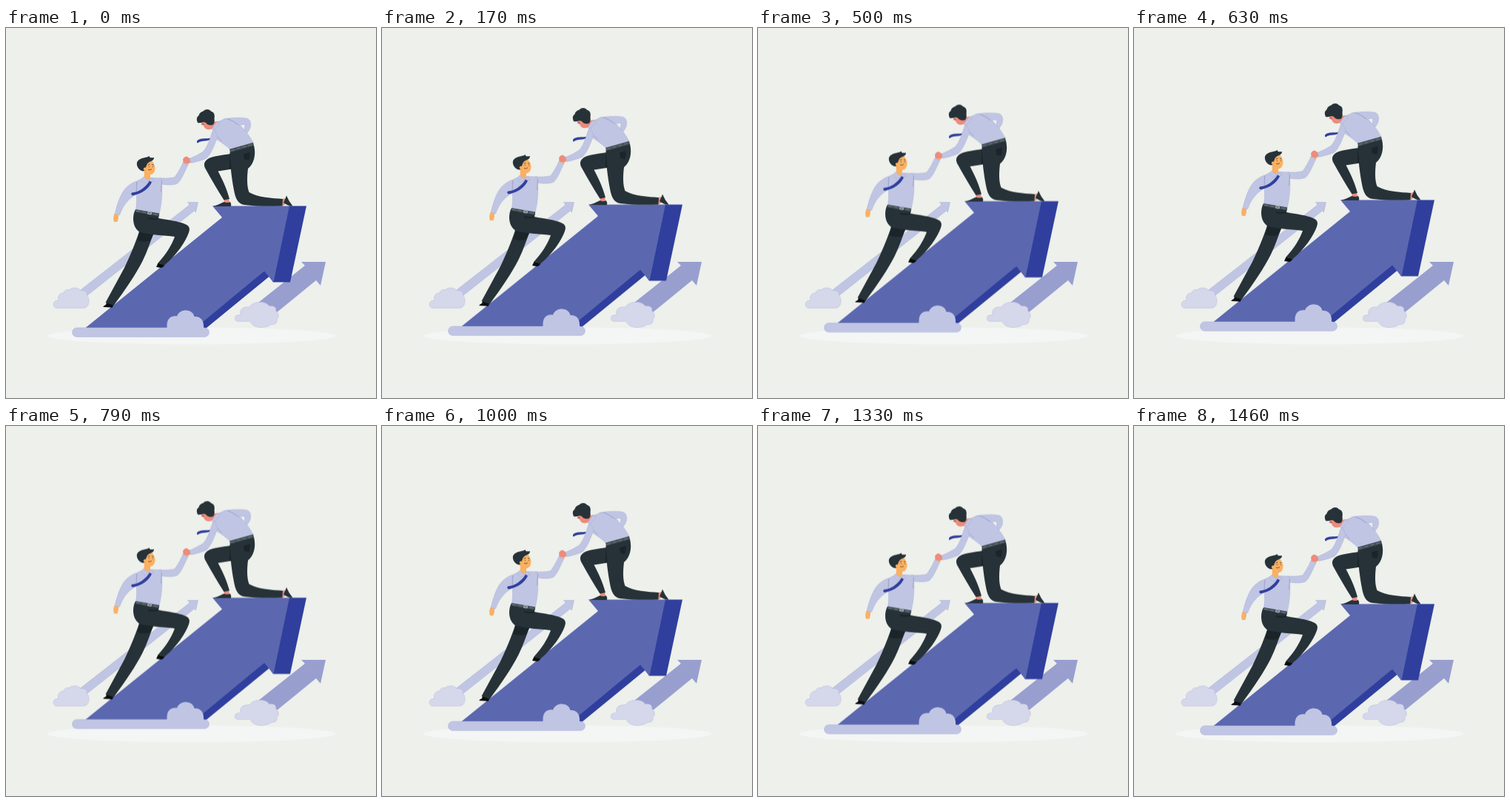
Recreate the animation shown at these times as an HTML page. Size 500 by 500 pixels, loop 1500 ms.

```html
<!DOCTYPE html>
<html lang="en">
<head>
<meta charset="utf-8">
<title>Helping hand</title>
<style>
  html, body { margin: 0; width: 100%; height: 100%; overflow: hidden; background: #edf0eb; }
  svg { display: block; width: 100%; height: 100%; }
  .pale { fill: #c0c5e3; }
  .mist { fill: #d5d7ea; stroke: #b9bedf; stroke-width: .5; }
  .front { fill: #5b68b0; }
  .navy { fill: #303f9d; }
  .shirt { fill: #c0c5e3; stroke: #a4aad3; stroke-width: .4; }
  .dark { fill: #263238; }
  .deep { fill: #1b2429; }
  .black { fill: #0b0d0f; }
  .pink { fill: #ed8b7c; }
  .tan { fill: #fbb062; }
  .belt { fill: #455158; }
  .fold { fill: none; stroke: #8b93c6; stroke-width: .6; }
  .mark { fill: none; stroke: #263238; stroke-width: .7; stroke-linecap: round; }
  .stitch { fill: none; stroke: #808b92; stroke-width: .7; stroke-dasharray: 5 3; }
  .lift { animation: lift .75s cubic-bezier(.35, .26, .65, .74) -.02s infinite alternate; }
  @keyframes lift {
    from { transform: translateY(.2px); }
    to { transform: translateY(-9.1px); }
  }
</style>
</head>
<body>
<svg viewBox="0 0 500 500">
  <ellipse cx="250.5" cy="416" rx="194.5" ry="11.5" fill="#f4f5f5"/>

  <!-- Far arrows and clouds -->
  <path class="shirt" d="M97 357 L248 239 L245.500 235.500 L259.500 235.500 L256.500 249 L254.500 247 L106 364.500Z"/>
  <path class="mist" d="M69 378.500 A5 5 0 0 1 69 368.500 L71 368.500 C69 363 72 358 78 358 C79 354 82 353 85 354 C89 350 98 350 101 355 C106 354 110 357 109.500 361.500 C113 365 113 372 110 376 Q108 378.500 104 378.500Z"/>
  <path fill="#989fcf" d="M341 371 L404 321 L399 316 L432 316 L425 348 L419 341 L362 387.500Z"/>
  <path class="mist" d="M313 396.500 A4.300 4.300 0 0 1 313 388 L317 387.500 C315 381 320 376 329 377 C332 372 338 370 344 370.500 C350 370.500 354 373 356 376 C362 374.500 366 378 364.500 382 C369 385 369.500 391 366 394 C367 398 364 401 359 400.500 C354 404.500 348 404.500 343 404.500 C336 404 332 401 330 396.500Z"/>

  <g class="lift">
    <!-- Main arrow -->
    <path class="navy" d="M382 240.500 H406 L384 343.500 H361 L355.500 336 L270 406 H250 L349 328Z"/>
    <path class="front" d="M107 405.500 L292 256 L279 240.500 H383 L361.500 343.500 L349 328.500 L256 405.500Z"/>

    <!-- Climber -->
    <path class="black" d="M136 370.500 L145.500 374 L143.500 378 L140 377.500 L131 377 Q132.500 375 135 374Z"/>
    <path class="dark" d="M182 268 C178 283 170 303 160 324 L134.500 371 L145.500 375 C161 354 176 332 184.500 315 C191 302 195 289 200 276Z"/>
    <path class="deep" d="M181 274 L177.500 287 Q186 290 195 287.500 L200 277Z"/>
    <path class="black" d="M205.500 317.500 L214.500 320 Q212 324.500 209 324 L203 323Z"/>
    <path class="dark" d="M174.500 246 L207 252 L206 257 C219 259.500 233 261 242 265 C248 267.500 249 271 247 276.500 C243 288 230 308 214 320.500 L205.500 317.500 C217 305 224 293 228 282 C213 280 194 279.500 183 276.500 C172 273 169.500 257 174.500 246Z"/>
    <path class="tan" d="M146.500 251 L152 252 Q152.500 257 150.500 262 L146 262 Q144 257 146.500 251Z"/>
    <path class="shirt" d="M182 205.500 C171 207.500 162 214 157 223 C152 232 149 243 147 251.500 L153.500 253 C157 243 163 232 176.500 224.500Z"/>
    <path class="tan" d="M239 183 Q239 178 243 178 L248 180 Q247.500 184 244.500 186.500Z"/>
    <path class="shirt" d="M207 202.500 C214 203.500 222 203 228 201.500 C232 196 236 189 239 182 L246 185 C241 195 238 204 232 210 C226 213 217 212 208 211Z"/>
    <path class="shirt" d="M178 206.500 C182 203.500 186 203 189 202 L196 202.500 C201 202.500 206 202.500 209.500 203.500 C212 217 211 236 207 251 L175.500 245.500 C178 232 174.500 218 178 206.500Z"/>
    <path class="fold" d="M176.500 208 L176 225 M210.500 206 L209.500 221"/>
    <path class="tan" d="M187 192 L195 196 L195 204 Q190 207 186.500 203.500Z"/>
    <path class="shirt" d="M186 201 L193 207 L187.500 210.500 L182.500 204.500Z M193 207 L197 202 L200 208Z"/>
    <path class="navy" d="M194 206.500 L197 208.500 C193 217 184 224 171 226.500 L169 224.500 L170 222.500 C179 222 188 216 194 206.500Z"/>
    <path class="tan" d="M186 186 Q189 180 197 179.500 Q201 183.500 201.500 189.500 Q201 197.500 195 198.500 Q188 198 185 192Z"/>
    <path class="dark" d="M185 193.500 C179 192 176 186.500 177 181.500 C179 177 184 176 188 175 Q192 174.500 193.500 173 L194.500 175 Q197.500 175.500 200 175 Q200 178.500 196 180 C192 181.500 190 183.500 189.500 187 L188 190 Q188 193 185 193.500Z"/>
    <circle class="tan" cx="187.800" cy="190.500" r="2"/>
    <path class="mark" d="M192 185 L194 184.300 M197.500 184.500 L199 185 M193.300 187.200 V187.600 M198.300 187.200 V187.600 M192.500 191.500 Q194.500 192.500 196.500 191"/>
    <path class="belt" d="M175 245 L207.300 250.500 L206.500 254.500 L174.500 248.500Z"/>
    <path class="stitch" d="M176 247.200 L206 252.500"/>
    <path fill="none" stroke="#c3c8cc" stroke-width=".9" d="M192 248.600 L196.500 249.400 L196 252 L191.500 251.200Z"/>
    <path class="deep" d="M192 256 Q199 258 205 256.500 L206 258 Q199 260 192 258Z"/>

    <!-- Helper -->
    <path class="shirt" fill-rule="evenodd" d="M294 123 C304 121 317 120.500 325 122 C331 123.500 331.500 130 330 135 C328 140 325 143 322 146 L313 139Z M316 131 L323 130.500 L322 138Z"/>
    <path class="pink" d="M294.500 230 L301 229.500 L302 236 H295Z"/>
    <path class="dark" d="M279.500 241 Q287 239 294.500 235 Q299 237 303 235 Q305 238 304 241Z"/>
    <path class="dark" d="M303 170 C293 172 279 172.500 272 177.500 C267 181 267 186 270 191 C277 204 286 219 294.500 232.500 L302 231 C298 216 292 204 286.500 193.500 L306 190.500Z"/>
    <path class="pink" d="M373 231 L378 230 L379 237 L373.500 240.500Z"/>
    <path class="dark" d="M379 226.500 Q382 234 387.500 240.500 H384 Q379 239 375 236 Q377.500 231 379 226.500Z"/>
    <path class="dark" d="M302.500 167 L335 158.500 C338 171 335.500 183 327 190 C325.500 203 325.500 214 328.500 222 C340 229 360 230 374 231 L373.500 240.500 C356 241 337 241 322 239 C313 237.500 310 230 308 219 C305 203 303 188 302.500 167Z"/>
    <path class="deep" d="M321 170.500 L329.500 168 Q330 175 328 179 L322 177.500Z M302.500 171 L304.500 190 L302 190.500Z"/>
    <path class="pink" d="M278 127 L288 126 L288 134 L280 137Z"/>
    <path class="navy" d="M277 148.500 C270 150 266 148.500 261 150.500 C258 151.500 257 154 259 155.500 C264 151.500 270 154 277 150.500Z"/>
    <path class="shirt" d="M281 134 C285 127 292 123 299 122.500 C311 126 325 137 334 155 L303 164.500 C295 156 284 151 277.500 145Z"/>
    <path class="pink" d="M239 178 Q240 174 244 173.500 L249 176.500 L249.500 182 Q244 184 240 182Z"/>
    <path class="shirt" d="M281 135 C276 147 273 160 266.500 167 Q257 173 248 176.500 L250 182.500 Q262 180 271 176 C278 169 282 157 286 147Z"/>
    <path class="shirt" d="M277.500 136.500 L284 127.500 L289 126 L288 131 L282 137.500Z"/>
    <path class="fold" d="M286 147 L292 153 M299 122.500 Q306 125 314 131"/>
    <path class="pink" d="M265 126 L281 123 Q283 133 277.500 136.500 Q272 138.500 268.500 135 L267 132 L263.500 130.500Z"/>
    <path class="dark" d="M259 128 C257 124 257.500 120 260.500 118.500 C261 115 264 113 266.500 112.500 C270 109 275 109.500 277 112.500 C281 113.500 282.500 117 281.500 122 C282 127 281.500 130 279 131 Q275 132 272 130 Q270 127 267 127 Q262 129 259 128Z"/>
    <path class="mark" d="M265.500 129.500 L267 130.200"/>
    <path class="belt" d="M302 163.800 L334 154.800 L335 158.800 L303.200 168Z"/>
    <path class="stitch" d="M304 165.700 L334 157"/>

    <!-- Ground bar and cloud -->
    <rect class="shirt" x="89.500" y="405" width="185" height="12.500" rx="6.250"/>
    <path class="pale" d="M217.500 408 V402 C217.500 393 223 388.500 231 389.500 C233 384 238 381.500 243 381.500 C249 381.500 253.500 385 254.500 390 C262 389 267 394.500 267 402 V408Z"/>
  </g>
</svg>
</body>
</html>
```
